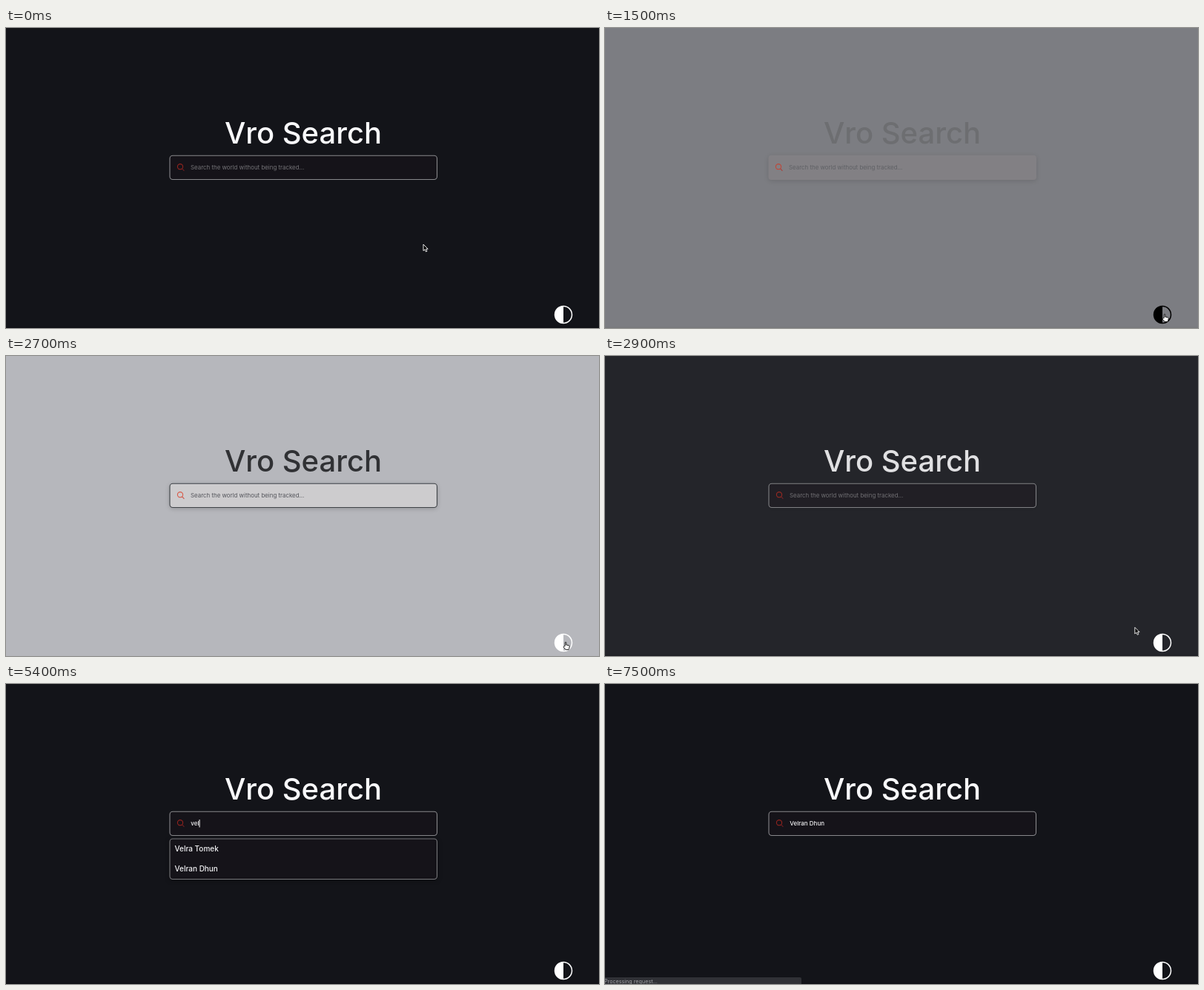
An HTML page with a canvas that plays this animation: 800 by 405 pixels, repeating every 8000 ms.

```html
<!DOCTYPE html>
<html lang="en">
<head>
<meta charset="utf-8">
<title>Search page</title>
<style>
  html, body { margin: 0; width: 100%; height: 100%; overflow: hidden; background: #131419; }
  canvas { display: block; }
</style>
</head>
<body>
<canvas id="stage" width="800" height="405"></canvas>
<script>
const ctx = document.getElementById('stage').getContext('2d');
const LOOP = 8000, FADE = 400, TO_LIGHT = 1377, TO_DARK = 2643;
const PEOPLE = ['Velra Tomek', 'Velran Dhun', 'Vanja Ostrel', 'Vedo Karlim',
                'Vesna Dralik', 'Vimor Teshan', 'Volen Hadrik', 'Vusha Perlon'];
const PATH = [[100, 563, 292], [500, 745, 387], [700, 745, 387],
              [1200, 755, 386], [2780, 755, 386], [3400, 351, 188], [3600, 349, 188]];
const ARROW = new Path2D('M0 0V8.7L2 6.9 3.4 10 5 9.3 3.6 6.3H6.2Z');
const HAND = new Path2D('M-.8 5.5V1a.8.8 0 0 1 1.6 0V4l3.6.8q.9.3.8 1.3l-.5 2.6-.7 1.8H.4L-2.8 7.2q-.5-1 .6-1.2z');
const IBEAM = new Path2D('M-2-5Q0-5 0-3.8Q0-5 2-5M0-4V4M-2 5Q0 5 0 3.8Q0 5 2 5M-1 1H1');

const clamp = x => Math.min(1, Math.max(0, x));
const smooth = x => x * x * (3 - 2 * x);
const mix = (a, b, k) => `rgb(${a.map((v, i) => v + (b[i] - v) * k)})`;

// CSS "ease": cubic-bezier(.25, .1, .25, 1)
function ease(x) {
  if (x <= 0 || x >= 1) return clamp(x);
  let lo = 0, hi = 1, s = .5;
  const curve = (a, b) => 3 * (1 - s) ** 2 * s * a + 3 * (1 - s) * s * s * b + s ** 3;
  for (let i = 0; i < 16; i++) {
    s = (lo + hi) / 2;
    if (curve(.25, .25) < x) lo = s; else hi = s;
  }
  return curve(.1, 1);
}

function text(str, x, y, size, weight, color, align = 'left') {
  ctx.font = `${weight} ${size}px Inter, sans-serif`;
  ctx.textAlign = align;
  ctx.fillStyle = color;
  ctx.fillText(str, x, y);
}

function panel(x, y, w, h, fill, border, shadow) {
  ctx.save();
  ctx.beginPath();
  ctx.roundRect(x, y, w, h, 4);
  ctx.shadowColor = `rgba(0,0,0,${shadow})`;
  ctx.shadowBlur = 6;
  ctx.shadowOffsetY = 1.5;
  ctx.fillStyle = fill;
  ctx.fill();
  ctx.restore();
  if (border) {
    ctx.strokeStyle = border;
    ctx.lineWidth = 1.1;
    ctx.stroke();
  }
}

function drawIcon(x, light) {
  ctx.lineWidth = 1.1;
  ctx.strokeStyle = mix([146, 36, 31], [232, 100, 78], light);
  ctx.beginPath();
  ctx.arc(x, 187.2, 3.6, 0, 7);
  ctx.stroke();
  ctx.strokeStyle = mix([108, 30, 34], [222, 96, 84], light);
  ctx.beginPath();
  ctx.moveTo(x + 2.6, 189.8);
  ctx.lineTo(x + 5.4, 192.8);
  ctx.stroke();
}

function drawToggle(color) {
  ctx.fillStyle = ctx.strokeStyle = color;
  ctx.lineWidth = 1.5;
  ctx.beginPath();
  ctx.arc(752, 387, 11.5, 0, 7);
  ctx.stroke();
  ctx.beginPath();
  ctx.arc(752, 387, 11.5, Math.PI / 2, Math.PI * 1.5);
  ctx.fill();
}

function typedText(t) {
  if (t >= 6600) return PEOPLE[1];
  return 'vel'.slice(0, t < 4800 ? 0 : t < 5000 ? 1 : t < 5200 ? 2 : 3);
}

function drawList(t) {
  if (t < 4900 || t >= 6600) return;
  const names = t < 5400 ? PEOPLE : PEOPLE.slice(0, 2);
  const selected = t < 6200 ? -1 : t < 6400 ? 0 : 1;
  panel(221, 209, 360.5, names.length * 26.5 + 1.5, '#151319', '#77777b', .4);
  names.forEach((name, i) => {
    const y = 222.8 + i * 26.5;
    if (i === selected) {
      ctx.fillStyle = '#29272d';
      ctx.fillRect(222, y - 12.5, 358.5, 26);
    }
    text(name, 227.5, y + 3.5, 10, 500, '#f4f4f6');
  });
}

function drawStatus(t) {
  ctx.globalAlpha = clamp((t - 6750) / 300);
  ctx.fillStyle = '#303136';
  ctx.beginPath();
  ctx.roundRect(-4, 396, 269, 14, 2);
  ctx.fill();
  text('Processing request...', -1, 404.3, 7.2, 400, '#a0a1a5');
  ctx.globalAlpha = 1;
}

function drawCursor(t) {
  if (t >= 4800) return;
  let [, x, y] = PATH[0];
  for (let i = 1; i < PATH.length; i++) {
    const [t0, x0, y0] = PATH[i - 1], [t1, x1, y1] = PATH[i];
    if (t < t0) break;
    const k = smooth(clamp((t - t0) / (t1 - t0)));
    x = x0 + (x1 - x0) * k;
    y = y0 + (y1 - y0) * k;
  }
  ctx.save();
  ctx.translate(x, y);
  ctx.lineJoin = 'round';
  if (x > 221 && x < 581 && y > 172 && y < 205) {
    ctx.strokeStyle = '#111';
    ctx.lineWidth = 2.2;
    ctx.stroke(IBEAM);
    ctx.strokeStyle = '#ddd';
    ctx.lineWidth = 1;
    ctx.stroke(IBEAM);
  } else {
    const hand = Math.hypot(x - 752, y - 387) < 12, shape = hand ? HAND : ARROW;
    ctx.fillStyle = hand ? '#fff' : '#000';
    ctx.strokeStyle = hand ? '#111' : '#fff';
    ctx.lineWidth = .9;
    ctx.fill(shape);
    ctx.stroke(shape);
  }
  ctx.restore();
}

function draw(t) {
  const light = ease((t - TO_LIGHT) / FADE) - ease((t - TO_DARK) / FADE);
  const titleLight = 1 - (1 - light) ** 1.25;
  const isLight = t >= TO_LIGHT && t < TO_DARK;
  const inset = isLight ? 0 : 1;

  ctx.fillStyle = mix([19, 20, 25], [217, 218, 223], light);
  ctx.fillRect(0, 0, 800, 405);
  ctx.fillStyle = `rgba(0,0,0,${.2 * (1 - light) ** 2})`;
  ctx.fillRect(0, 403.5, 800, 1.5);

  text('Vro Search', 401, 156, 40, 500, mix([248, 248, 250], [22, 23, 27], titleLight), 'center');
  panel(220.5 + inset / 2, 171.7 + inset / 2, 361.5 - inset, 33.3 - inset,
        mix([21, 19, 25], [253, 252, 253], light ** 1.2),
        inset && mix([136, 136, 139], [48, 52, 58], light), .25 * light);
  drawIcon(234 + inset, light);

  const typed = typedText(t), textX = 248 + inset;
  if (typed) text(typed, textX + .3, 190.8, 8, 500, '#f4f4f6');
  else text('Search the world without being tracked...', textX, 190.8, 7.9, 400,
            mix([116, 115, 119], [77, 79, 85], light));

  const caretOn = t >= 3500 && t < 7500 && !(t >= 4000 && t < 4500) && !(t >= 5800 && t < 6200);
  if (caretOn) {
    ctx.fillStyle = '#fff';
    ctx.fillRect(textX + (typed ? ctx.measureText(typed).width + .4 : .2), 183, 1, 10.5);
  }

  drawToggle(isLight ? '#000' : '#fff');
  drawList(t);
  drawStatus(t);
  drawCursor(t);
}

const start = performance.now();
function tick() {
  draw((performance.now() - start) % LOOP);
  requestAnimationFrame(tick);
}
tick();
</script>
</body>
</html>
```
